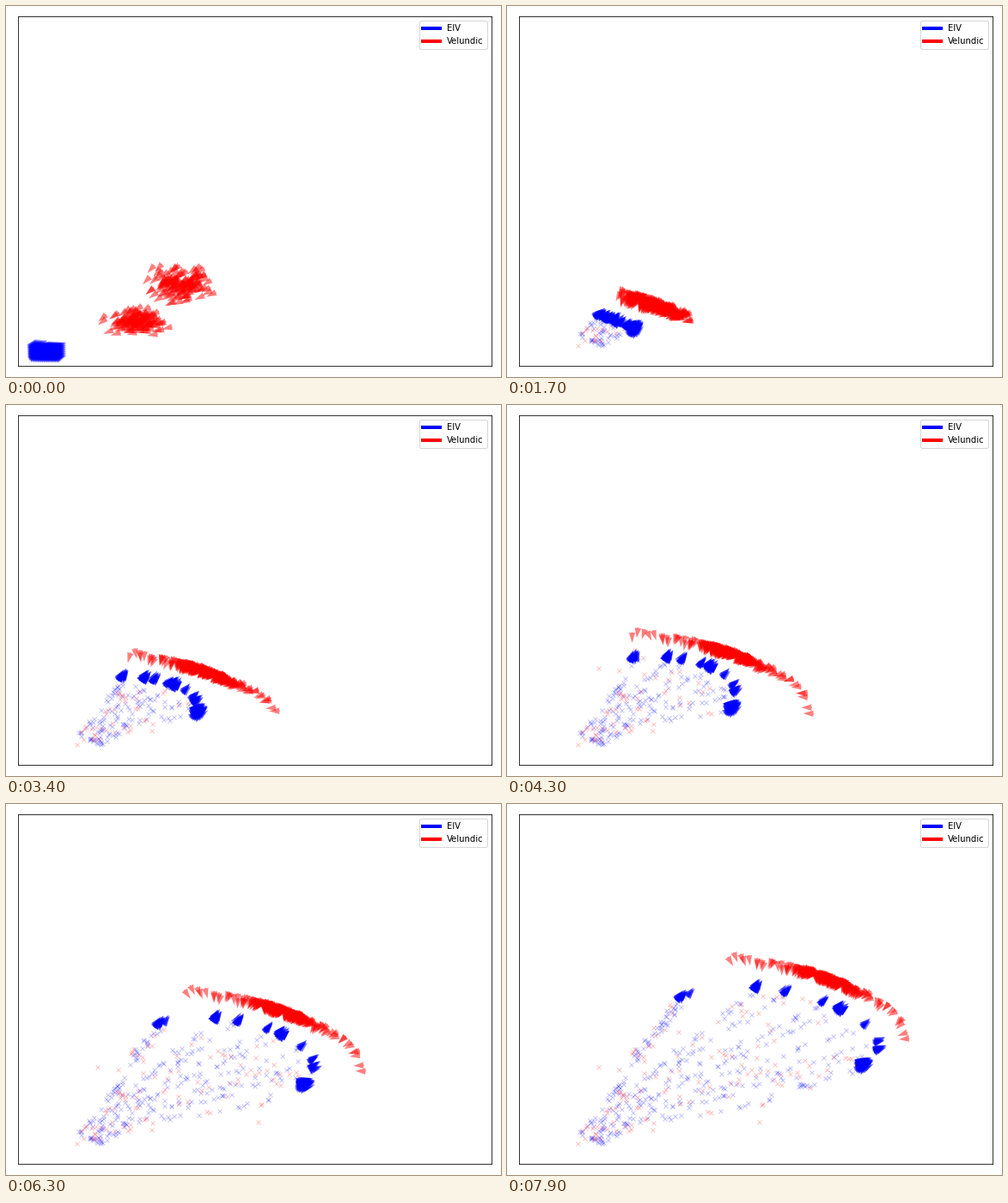
Recreate the animation shown at these times as a matplotlib script. Size 576x432 px, loop 8000 ms.

```python
import numpy as np
import matplotlib.pyplot as plt
from matplotlib.animation import FuncAnimation
from matplotlib.collections import PolyCollection
from matplotlib.lines import Line2D

W, H = 576, 432
FRAMES, STEP = 80, 100
N_BLUE, N_RED = 200, 300
MEET, END = 0.9, 7.9
rng = np.random.default_rng(4)


def disc(n):
    """Random points in the unit disc."""
    a, r = rng.uniform(0, 2 * np.pi, n), np.sqrt(rng.uniform(0, 1, n))
    return np.column_stack([r * np.cos(a), r * np.sin(a)])


def blend(t, times, points):
    """Linear motion through a few key points."""
    p = np.array(points, float)
    flat = [np.interp(t, times, c) for c in p.reshape(len(times), -1).T]
    return np.reshape(flat, p.shape[1:])


def center(t):
    return blend(t, (MEET, 2.4, END), [(141, 361), (205, 332), (375, 200)])


# Blue: clumps along a cubic curve that widens behind the red front.
CURVES = [
    [(-55, 22), (-48, 26), (-40, 30), (-33, 33)],
    [(-86, 12), (-75, 16), (-45, 20), (-28, 34)],
    [(-119, 12), (-70, 5), (20, 20), (-6, 69)],
    [(-176, 28), (-60, -15), (110, 70), (35, 106)],
]
CLUMP_AT = np.array([0, 0.03, 0.24, 0.33, 0.46, 0.53, 0.66, 0.78, 0.85, 1])
CLUMP_SIZE = np.array([11, 3, 14, 9, 6, 20, 4, 5, 9, 44])
ranks = (np.arange(N_BLUE) + 0.5) / N_BLUE * CLUMP_SIZE.sum()
clump = np.searchsorted(np.cumsum(CLUMP_SIZE), ranks)
blue_spread = disc(N_BLUE) * np.sqrt(CLUMP_SIZE[clump])[:, None]


def clumps(t):
    p = blend(t, (MEET, 2.4, 4.3, END), CURVES)
    v = CLUMP_AT[:, None]
    w = np.hstack([(1 - v) ** 3, 3 * v * (1 - v) ** 2, 3 * v ** 2 * (1 - v), v ** 3])
    return center(t) + w @ p


# Red: one arc hooked at its right end, dense in the middle, with thin wings.
arc_q = np.arange(-140, 141)
k = arc_q / 100
bend = 0.35 + 0.25 * k + 1.6 * np.maximum(k - 0.5, 0) ** 2
arc_x, arc_y = np.cumsum(np.cos(bend)), np.cumsum(np.sin(bend))
arc_x, arc_y = arc_x - arc_x[140], arc_y - arc_y[140]
rank = np.linspace(-1, 1, N_RED)
red_spread = disc(N_RED)


def front(t):
    q = 36 * rank + np.interp(t, [1.5, 4.3], [0, 85]) * rank ** 13
    arc = np.column_stack([np.interp(q, arc_q, arc_x), np.interp(q, arc_q, arc_y)])
    return center(t) + arc + red_spread * np.interp(t, [MEET, 2.4], [10, 4])


# Starting formations
gx, gy = np.meshgrid(np.linspace(27, 59, 20), np.linspace(397, 412, 10), indexing="ij")
blue_start = np.column_stack([gx.ravel(), gy.ravel()])
noise = np.clip(rng.normal(size=(N_RED, 2)), -2.4, 2.4)
upper = (np.arange(N_RED) % 2)[:, None]
red_start = np.where(upper, (206, 322), (155, 365)) + noise * np.where(upper, (16, 9), (16, 7))
red_start = red_start[np.argsort(red_start[:, 0])]


def blue_at(t):
    f = min(t / MEET, 1)
    return (1 - f) * blue_start + f * (clumps(t)[clump] + blue_spread)


def red_at(t):
    f = min(t / MEET, 1)
    return (1 - f) * red_start + f * front(t)


def unit(v):
    return v / np.maximum(np.hypot(*v.T), 1e-6)[:, None]


def toward(own, foe):
    """Directions to the nearest opponent, in units where x is compressed."""
    d = (foe[None] - own[:, None]) * (0.74, 1)
    near = np.argmin((d ** 2).sum(2), axis=1)
    return unit(d[np.arange(len(own)), near])


ARROW = np.array([(0, 1.3), (0.8, 1.3), (0.2, 3.8), (12.3, 0),
                  (0.2, -3.8), (0.8, -1.3), (0, -1.3)])


def arrows(pos, u):
    side = np.column_stack([-u[:, 1], u[:, 0]])
    return (pos[:, None] + ARROW[None, :, :1] * u[:, None]
            + ARROW[None, :, 1:] * side[:, None])


def losses(n, jitter):
    """Crosses dropped where the clumps are at random moments."""
    t = np.sort(rng.uniform(0.7, END, n))
    pick = rng.integers(len(CLUMP_AT), size=n)
    pos = np.array([clumps(s)[j] for s, j in zip(t, pick)])
    return t, pos + rng.normal(0, jitter, pos.shape)


blue_t, blue_x = losses(380, 2)
red_t, red_x = losses(130, 9)

fig = plt.figure(figsize=(W / 72, H / 72), dpi=72, facecolor="white")
ax = fig.add_axes([14 / W, 13 / H, 551 / W, 407 / H])
ax.set(xlim=(14, 565), ylim=(419, 12), xticks=[], yticks=[])

cross = dict(ls="", marker="x", ms=5, mew=1, alpha=0.23)
blue_marks, = ax.plot([], [], color="b", **cross)
red_marks, = ax.plot([], [], color="r", **cross)
blue_army = PolyCollection([], facecolor="b", edgecolor="none", alpha=0.5, zorder=3)
red_army = PolyCollection([], facecolor="r", edgecolor="none", alpha=0.5, zorder=3)
ax.add_collection(blue_army, autolim=False)
ax.add_collection(red_army, autolim=False)
ax.legend([Line2D([], [], color=c, lw=4) for c in "br"], ["EIV", "Velundic"],
          loc="upper right", fontsize=10)


def update(i):
    t = i * STEP / 1000
    blue, red = blue_at(t), red_at(t)
    outward = unit(blue - (20, 420))
    blue_army.set_verts(arrows(blue, unit(toward(blue, red) + outward)))
    red_army.set_verts(arrows(red, toward(red, blue)))
    blue_marks.set_data(*blue_x[blue_t <= t].T)
    red_marks.set_data(*red_x[red_t <= t].T)
    return blue_army, red_army, blue_marks, red_marks


anim = FuncAnimation(fig, update, frames=FRAMES, interval=STEP, repeat=True, repeat_delay=0)
plt.show()
```
